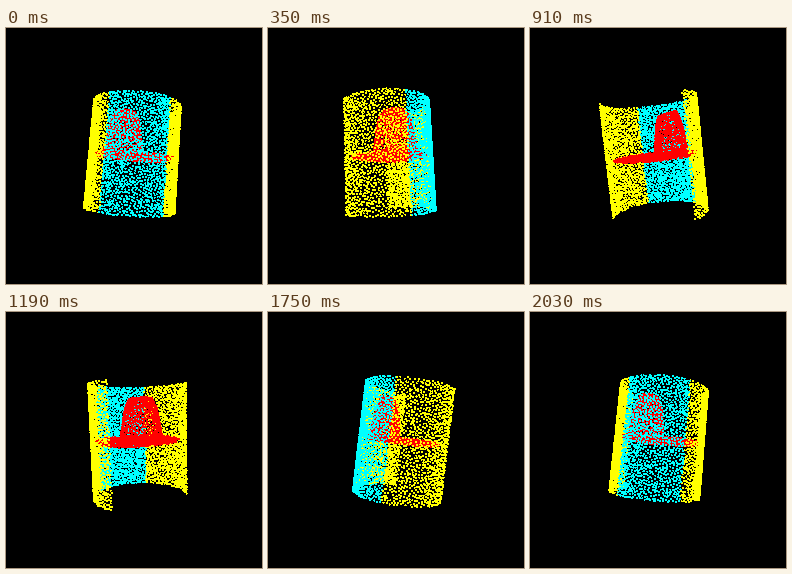
Animation, 256 px wide and 256 px high, one loop 2100 ms. Source, as a matplotlib script:

```python
import numpy as np
import matplotlib.pyplot as plt
from matplotlib.animation import FuncAnimation

SIZE, DPI = 256, 100
FRAMES, STEP = 30, 70
CAMERA = 255            # eye distance, in pixels
RADIUS, HALF_H = 45.5, 54.5
SHIFT = 10              # shell axis offset towards its opening
OPENING = np.radians(60)
BAND = np.radians(38)   # half width of the cyan strip
TILT = np.radians(7)
LEAN = np.radians(-42)
START = np.radians(-176.5)
DOT = 1.1               # drawn without smoothing, so it fills about 2 x 2

CYAN, YELLOW, RED = (0, 1, 1), (1, 1, 0), (1, 0, 0)
rng = np.random.default_rng(5)


def spread(n, width, height, tries=16):
    """Evenly scattered random points in a width x height rectangle."""
    pts = np.empty((n, 2))
    pts[0] = rng.random(2) * (width, height)
    for i in range(1, n):
        cand = rng.random((tries, 2)) * (width, height)
        gap = cand[:, None] - pts[None, :i]
        pts[i] = cand[(gap ** 2).sum(2).min(1).argmax()]
    return pts


def shell(n, a0, a1):
    arc, v = spread(n, RADIUS * (a1 - a0), 2 * HALF_H).T
    a = a0 + arc / RADIUS
    return np.c_[RADIUS * np.sin(a), v - HALF_H, SHIFT + RADIUS * np.cos(a)]


def brim(n, wide=39, deep=33, center=6, thick=3):
    """Flat disc with a slightly squared outline."""
    k = np.arange(n)
    r = np.sqrt((k + 0.5) / n)
    a = k * np.pi * (3 - np.sqrt(5))
    sin, cos = np.sin(a), np.cos(a)
    q = r / (abs(sin) ** 3 + abs(cos) ** 3) ** (1 / 3)
    v = rng.uniform(-1, 1, n) * thick * np.sqrt(1.1 - r ** 4)
    return np.c_[wide * q * sin, v, center + deep * q * cos]


def crown(n, along=14.5, across=22, center=7, back=18):
    t, a = (spread(n, 50, 115) / (50, 115) * (1.2, 2 * np.pi)).T
    side = np.minimum(t, 1)
    scale = np.where(t < 1, 1 - 0.3 * side - 0.17 * side ** 6,
                     0.53 * np.sqrt(np.clip((1.2 - t) / 0.2, 0, 1)))
    e, f = along * scale * np.cos(a), across * scale * np.sin(a)
    v = 2 + side * (39 + 0.25 * e)
    e = e + back
    x = -e * np.sin(LEAN) + f * np.cos(LEAN)
    z = center - e * np.cos(LEAN) - f * np.sin(LEAN)
    return np.c_[x, v, z]


def tilt(p):
    """Lean the whole model sideways about its centre."""
    d = np.array([np.sin(LEAN), np.cos(LEAN)])
    along = p[:, [0, 2]] @ d
    moved = along * np.cos(TILT) + p[:, 1] * np.sin(TILT)
    x, z = (p[:, [0, 2]] + np.outer(moved - along, d)).T
    return x, p[:, 1] * np.cos(TILT) - along * np.sin(TILT), z


parts = [
    (shell(1050, OPENING, np.pi - BAND), YELLOW),
    (shell(1200, np.pi - BAND, np.pi + BAND), CYAN),
    (shell(1050, np.pi + BAND, 2 * np.pi - OPENING), YELLOW),
    (brim(1000), RED),
    (crown(700), RED),
]
X, Y, Z = tilt(np.vstack([p for p, _ in parts]))
COLORS = np.vstack([np.tile(c, (len(p), 1)) for p, c in parts])

fig = plt.figure(figsize=(SIZE / DPI, SIZE / DPI), dpi=DPI, facecolor="black")
ax = fig.add_axes([0, 0, 1, 1])
ax.set(xlim=(0, SIZE), ylim=(SIZE, 0))
ax.axis("off")
dots = ax.scatter(X, Y, s=(DOT * 72 / DPI) ** 2, c=COLORS,
                  linewidths=0, antialiaseds=False)


def update(i):
    turn = START + 2 * np.pi * i / FRAMES
    u = X * np.cos(turn) + Z * np.sin(turn)
    w = Z * np.cos(turn) - X * np.sin(turn)
    s = CAMERA / (CAMERA - w)
    order = np.argsort(w)
    pos = np.c_[SIZE / 2 + u * s, SIZE / 2 - Y * s]
    dots.set_offsets(pos[order])
    dots.set_facecolors(COLORS[order])
    return dots,


anim = FuncAnimation(fig, update, frames=FRAMES, interval=STEP,
                     repeat=True, repeat_delay=0)
plt.show()
```
